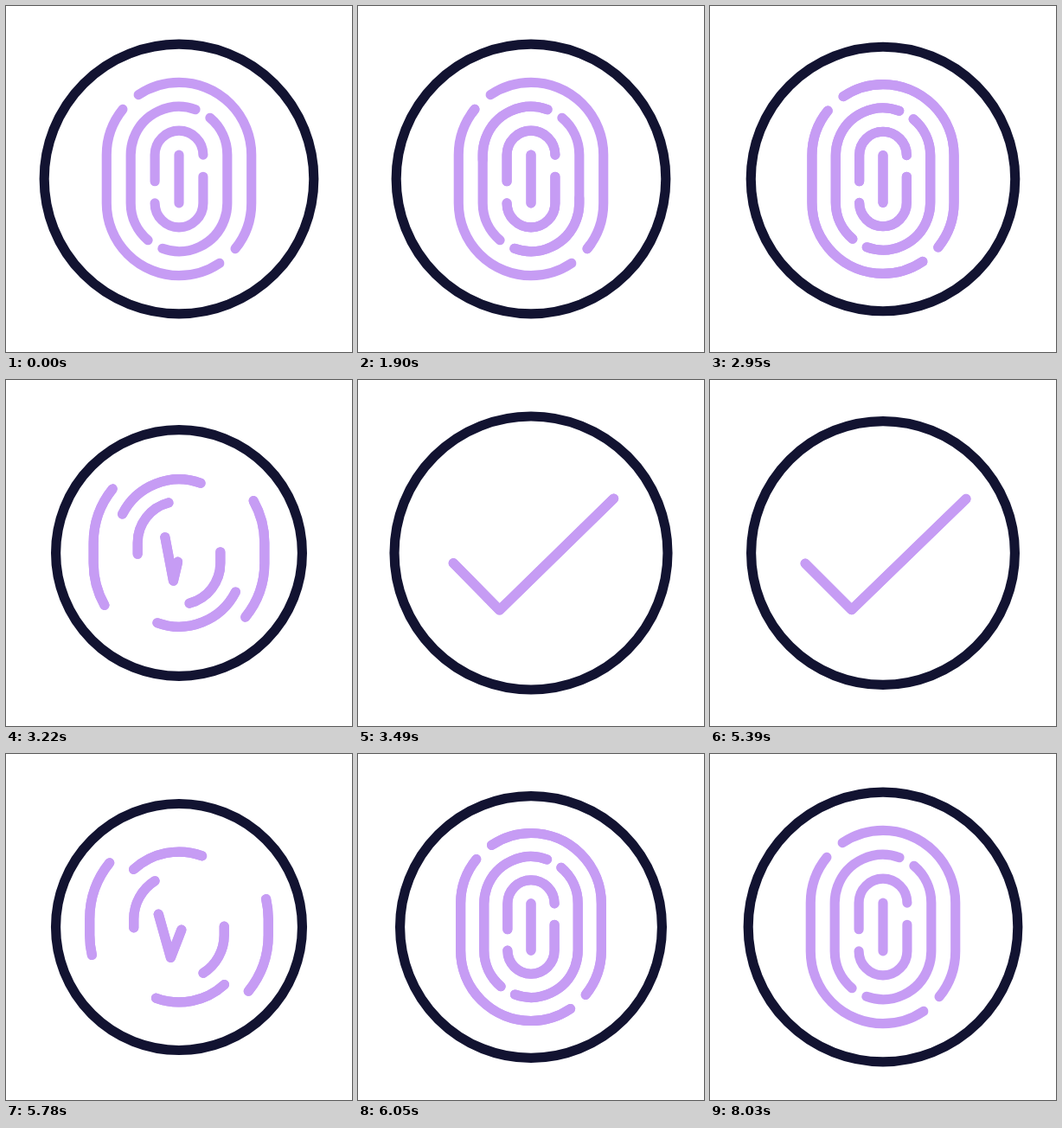
Animation, 400 px wide and 400 px high, one loop 8.06 s. Source, as an HTML page with a canvas:

```html
<!DOCTYPE html>
<html lang="en">
<head>
<meta charset="utf-8">
<title>Fingerprint to check mark</title>
<style>
  html, body { margin: 0; width: 100%; height: 100%; overflow: hidden; background: #fff; }
  canvas { display: block; width: 100%; height: 100%; }
</style>
</head>
<body>
<canvas id="stage" width="400" height="400"></canvas>
<script>
const ctx = document.getElementById('stage').getContext('2d');
const LOOP = 8060, STEP = 30, FIRST = 1000, LAST = 4000, BACK = 5030;
const UNIT = 400 / 430;
const DARK = '#121331', PURPLE = '#c69cf4';
const RAD = Math.PI / 180;

const lerp = (a, b, u) => a + (b - a) * u;
const mix = (p, q, u) => [lerp(p[0], q[0], u), lerp(p[1], q[1], u)];
const ramp = (t, a, b) => Math.min(1, Math.max(0, (t - a) / (b - a)));
const smooth = (t, a, b) => { const u = ramp(t, a, b); return u * u * (3 - 2 * u); };

// Each ridge is part of a capsule: half width w, straight half length s.
const ridges = [
  {
    w: 30, scan: [1000, 1900],
    length: (w, s) => 1.1 * s + Math.PI * w,
    trace(w, s) {
      ctx.moveTo(-w, 0.1 * s);
      ctx.arc(0, -s, w, Math.PI, 2 * Math.PI);
    }
  },
  {
    w: 60, scan: [1200, 2540],
    length: (w, s) => 160 * RAD * w + 2 * s,
    trace(w, s) {
      ctx.arc(0, -s, w, -70 * RAD, -180 * RAD, true);
      ctx.arc(0, s, w, 180 * RAD, 130 * RAD, true);
    }
  },
  {
    w: 90, scan: [1830, 2700],
    length: (w, s) => 163 * RAD * w + 2 * s,
    trace(w, s) {
      ctx.arc(0, s, w, 39 * RAD, 0, true);
      ctx.arc(0, -s, w, 0, -124 * RAD, true);
    }
  }
];

// Dip, overshoot, then settle at the given size.
function pulse(t, end) {
  if (t < 3240) return lerp(1, 0.9135, smooth(t, 2820, 3240));
  if (t < 3440) return lerp(0.9135, 1.03, smooth(t, 3240, 3440));
  return lerp(end, 1.03, Math.pow(1 - ramp(t, 3440, LAST), 2.5));
}

function strokeRidge(ridge, w, s, keep) {
  if (keep <= 0) return;
  const length = ridge.length(w, s);
  ctx.setLineDash(keep < 1 ? [keep * length, 2 * length] : []);
  for (const turn of [0, Math.PI]) {
    ctx.save();
    ctx.rotate(turn);
    ctx.beginPath();
    ridge.trace(w, s);
    ctx.stroke();
    ctx.restore();
  }
  ctx.setLineDash([]);
}

function drawRidges(t) {
  const out = smooth(t, 3000, 3420);
  const size = pulse(t, 1) * UNIT;
  const s = 30 * (1 - out) * size;
  for (const ridge of ridges) {
    const w = (ridge.w + 49 * out) * size;
    strokeRidge(ridge, w, s, 1 - out);
    // The scan retraces the ridge and firms up its edges.
    strokeRidge(ridge, w, s, Math.min(1 - out, smooth(t, ...ridge.scan)));
  }
}

function polyline(points) {
  ctx.beginPath();
  points.forEach(p => ctx.lineTo(...p));
  ctx.stroke();
}

function drawCheck(t) {
  const p = smooth(t, 3100, 3520);
  const grow = smooth(t, 3070, 3450);
  const size = pulse(t, 1);
  const place = (from, to) => mix(from, to, p).map(v => v * size);
  const start = place([0, -27.9], [-89, 12]);
  const bend = place([0, 27.9], [-36, 65]);
  const tip = mix(bend, place([-12, -28], [95, -62]), grow);
  const points = grow > 0 ? [start, bend, tip] : [start, bend];
  polyline(points);
  const scan = smooth(t, 1000, 1900);
  if (scan >= 1) polyline(points);
  else if (scan > 0) polyline([start, mix(start, bend, scan)]);
}

function draw(t) {
  ctx.setTransform(1, 0, 0, 1, 0, 0);
  ctx.fillStyle = '#fff';
  ctx.fillRect(0, 0, 400, 400);
  ctx.translate(200, 200);
  ctx.lineWidth = 12 * UNIT;
  ctx.lineCap = ctx.lineJoin = 'round';

  ctx.strokeStyle = DARK;
  ctx.beginPath();
  ctx.arc(0, 0, 167.5 * UNIT * pulse(t, 0.9525), 0, 2 * Math.PI);
  ctx.stroke();

  ctx.strokeStyle = PURPLE;
  drawRidges(t);
  drawCheck(t);
}

// Forward, hold, then the same motion backwards.
function pose(time) {
  const snap = d => Math.max(0, Math.floor(d / STEP) * STEP);
  return time < BACK
    ? Math.min(LAST, FIRST + snap(time - FIRST))
    : Math.max(FIRST, LAST - snap(time - BACK));
}

const begin = performance.now();
function frame() {
  draw(pose((performance.now() - begin) % LOOP));
  requestAnimationFrame(frame);
}
frame();
</script>
</body>
</html>
```
